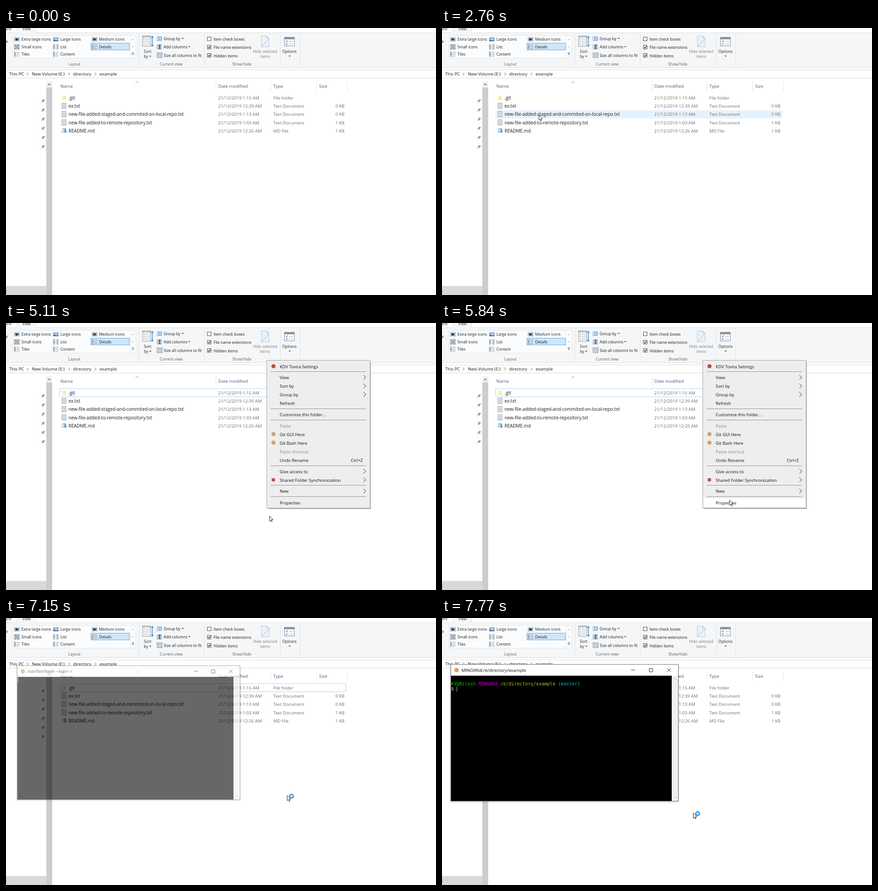
An HTML page for the animation above (8 s loop, 949 by 590 pixels).

```html
<!DOCTYPE html>
<html lang="en">
<head>
<meta charset="utf-8">
<title>Opening a shell from the file explorer</title>
<style>
  html, body { margin: 0; width: 100%; height: 100%; overflow: hidden; background: #fff; }
  svg { display: block; width: 100vw; height: 100vh; }
  text { font-family: "Open Sans", "Noto Sans", sans-serif; white-space: pre; }
  .mono { font-family: "DejaVu Sans Mono", "Liberation Mono", monospace; }
</style>
</head>
<body>
<svg id="stage" viewBox="0 0 949 590"></svg>
<script>
const LOOP = 8000;
const stage = document.getElementById('stage');

// --- markup helpers ---
const rect = (x, y, w, h, fill, stroke = 'none', extra = '') =>
  `<rect x="${x}" y="${y}" width="${w}" height="${h}" fill="${fill}" stroke="${stroke}" ${extra}/>`;
const path = (d, stroke, width = 1, fill = 'none') =>
  `<path d="${d}" stroke="${stroke}" stroke-width="${width}" fill="${fill}"/>`;
const dot = (x, y, r, fill) => `<circle cx="${x}" cy="${y}" r="${r}" fill="${fill}"/>`;
const text = (x, y, s, size, fill = '#1a1a1a', anchor = 'start') =>
  `<text x="${x}" y="${y}" font-size="${size}" fill="${fill}" text-anchor="${anchor}">${s}</text>`;
const vline = (x, y1, y2, color) => path(`M${x} ${y1}V${y2}`, color);
const hline = (y, x1, x2, color) => path(`M${x1} ${y}H${x2}`, color);
const caret = (x, y, color = '#333', dir = 1) =>
  path(`M${x - 2.3} ${y - dir}h4.6l-2.3 ${2.5 * dir}z`, 'none', 0, color);
const chevron = (x, y, w, h, color, width = 1) =>
  path(`M${x - w} ${y + h}L${x} ${y}L${x + w} ${y + h}`, color, width);
const group = (id, body) => `<g id="${id}">${body}</g>`;

// --- ribbon ---
const R = 8.55;

function layoutIcon(x, y, kind) {
  const frame = rect(x + .5, y + .5, 11, 8, '#fff', '#8b949c');
  if (kind === 'photo') return frame + rect(x + 2, y + 2, 8, 5, '#2d6fb5') + rect(x + 4, y + 3, 3, 4, '#1c2733');
  if (kind === 'large') return frame + rect(x + 1, y + 1, 10, 4, '#8dbce8') + path(`M${x + 1} ${y + 5}l5 1.5l5-.5v2h-10z`, 'none', 0, '#23508c');
  let s = '';
  if (kind === 'grid') {
    for (let i = 0; i < 9; i++)
      s += rect(x + .5 + i % 3 * 4, y - .5 + Math.floor(i / 3) * 4, 2.8, 2.8, i % 2 ? '#fff' : '#b9d0e6', '#78828c', 'stroke-width=".8"');
    return s;
  }
  for (let i = 0; i < 3; i++) {
    const yy = y - .5 + i * 4;
    s += rect(x + .5, yy, 2.6, 2.6, i === 1 ? '#8dbce8' : '#fff', '#78828c', 'stroke-width=".8"');
    s += hline(yy + 1.3, x + 5, x + (kind === 'list' ? 7 : 12), '#7d8791');
    if (kind === 'list') s += rect(x + 8.5, yy, 2.6, 2.6, '#fff', '#78828c', 'stroke-width=".8"');
  }
  return s;
}

function checkbox(y, label, on) {
  return rect(444.5, y - 4.5, 8, 8, '#fff', '#444') +
    (on ? path(`M446.3 ${y - .4}l1.8 2l3.2-4.2`, '#111', 1.4) : '') +
    text(458, y + 3.5, label, R);
}

function ribbon() {
  let s = rect(0, 10, 949, 77, '#f5f6f7') + rect(24, 0, 41, 11, '#f5f6f7') +
    path('M0 10.5H24.5V0M65.5 0V10.5H949', '#dcddde') + hline(87.5, 0, 949, '#dadbdc') +
    text(12, 5, 'Share', R, '#333', 'end') + text(36, 5, 'View', R, '#333') +
    text(4, 33, 'ne', R, '#333', 'end') + rect(0, 53, 1, 3, '#b9bec3');
  [293.5, 437.5, 605.5, 648.5].forEach(x => s += vline(x, 13, 84, '#e1e2e4'));

  s += rect(15.5, 16.5, 271, 50, '#fbfcfd', '#e3e5e7') + vline(274.5, 17, 66, '#e6e8ea');
  s += rect(187.5, 33.5, 85, 15, '#cfe6fa', '#64a9e3');
  [
    [18, 0, 'photo', 'Extra large icons'], [104, 0, 'large', 'Large icons'], [189.5, 0, 'photo', 'Medium icons'],
    [18, 1, 'grid', 'Small icons'], [104, 1, 'list', 'List'], [189.5, 1, 'details', 'Details'],
    [18, 2, 'details', 'Tiles'], [104, 2, 'details', 'Content']
  ].forEach(([x, row, kind, label]) => {
    const y = 20.5 + row * 16.3;
    s += layoutIcon(x, y, kind) + text(x + 16, y + 7.9, label, R);
  });
  s += caret(280, 25.5, '#b5b9bd', -1) + caret(280, 41.5, '#b5b9bd') +
    hline(54.5, 277.5, 282.5, '#2f4b8f') + caret(280, 58, '#2f4b8f');

  s += rect(301.5, 17.5, 18, 23, '#fff', '#8d959d') + rect(302, 18, 17, 3, '#b9c3cc');
  for (let i = 0; i < 7; i++) s += hline(22.5 + i * 2.6, 303, 318, i % 2 ? '#a3adb6' : '#c3cbd2');
  s += vline(307.5, 18, 40, '#fff') + vline(313.5, 18, 40, '#fff');
  s += path('M323 19V40M320.8 21.5L323 18.5L325.2 21.5M320.8 37.5L323 40.5L325.2 37.5', '#2c7fcb', 1.3);
  s += text(312.5, 54.6, 'Sort', R, '#222', 'middle') + text(309, 66, 'by', R, '#222', 'middle') + caret(318.5, 62.5);

  s += rect(336.5, 19.5, 7, 8, '#a9d2f3', '#5f9fd6') + path('M333.5 19v9M333 28.5h3M333 19h3', '#9aa2aa');
  s += rect(333.5, 37.5, 10, 9, '#fff', '#8b949c') + rect(338, 36, 3, 11, '#2d6fb5') + vline(336.5, 38, 46, '#333');
  s += rect(333.5, 57.5, 11, 8, '#fff', '#7d8791') + path('M333 60.5h12M333 63h12M337.5 57v9M341.5 57v9', '#8b949c', .8) +
    path('M333.5 55h11M333.5 53.5v3M344.5 53.5v3', '#2c7fcb', .9);
  s += text(348, 27.3, 'Group by', R) + caret(390, 23) + text(348, 45.3, 'Add columns', R) + caret(404.3, 41.3) +
    text(348, 63.6, 'Size all columns to fit', R);

  s += checkbox(24.5, 'Item check boxes', false) + checkbox(42.8, 'File name extensions', true) +
    checkbox(61, 'Hidden items', true);

  s += path('M563.5 17.5h12l5 5v19h-17z', '#b4c9dc', 1, '#e9f2fa') + path('M575.5 17.5v5h5M564 41L580 24', '#9dbbd6');
  s += text(572, 54.6, 'Hide selected', R, '#7b7e82', 'middle') + text(572, 66, 'items', R, '#7b7e82', 'middle');

  s += rect(614.5, 20.5, 22, 19, '#fff', '#7d868f') + rect(615, 21, 21, 4, '#8b949c');
  [29, 35].forEach(y => s += path(`M617.5 ${y}l1.6 1.8l3-3.8`, '#2c7fcb', 1.2) + hline(y + .5, 625, 634, '#a3abb3'));
  s += text(625.6, 54.6, 'Options', R, '#222', 'middle') + caret(626, 62);

  [['Layout', 151], ['Current view', 364.5], ['Show/hide', 520.5]]
    .forEach(([label, x]) => s += text(x, 83, label, R, '#5c5e60', 'middle'));
  return s;
}

// --- address bar, navigation pane, column heads ---
function chrome() {
  let s = hline(92.5, 0, 949, '#d9d9d9') + hline(110.5, 0, 949, '#d9d9d9');
  [[7, 'This PC'], [57, 'New Volume (E:)'], [148.3, 'directory'], [206.5, 'example']]
    .forEach(([x, label]) => s += text(x, 105.3, label, 9.6));
  [47.5, 139.3, 197.5].forEach(x => s += path(`M${x - 1.5} 98.7l3 3l-3 3`, '#555'));

  s += rect(0, 570, 89, 20, '#d9d9d9') + text(1.2, 584.5, ')', 9.6, '#1d3f7a', 'end');
  s += rect(89, 118, 13, 472, '#f0f0f0') + rect(89, 131.5, 13, 459, '#cdcdcd') + chevron(95.5, 123.3, 3, 3, '#505050', 1.2);
  for (let i = 0; i < 6; i++)
    s += `<g transform="translate(81.5 ${161.3 + i * 20.25}) rotate(45)">` +
      rect(-1.8, -4.3, 3.6, 4.3, '#8d959c') + rect(-3, 0, 6, 1.4, '#8d959c') + rect(-.5, 1, 1, 4, '#8d959c') + '</g>';

  [[120, 'Name'], [468.5, 'Date modified'], [590, 'Type'], [691, 'Size']]
    .forEach(([x, label]) => s += text(x, 132.4, label, 9.8, '#45597a'));
  [463.5, 584.5, 685.5, 753.5].forEach(x => s += vline(x, 117, 140, '#e4e5e7'));
  return s + chevron(289, 118.2, 3, 3, '#808080');
}

// --- file list ---
const ROW_TOP = 145.2, ROW_H = 18.2;
const FILES = [
  ['.git', '21/12/2019 1:15 AM', 'File folder', ''],
  ['ex.txt', '21/12/2019 12:39 AM', 'Text Document', '0 KB'],
  ['new-file-added-staged-and-commited-on-local-repo.txt', '21/12/2019 1:13 AM', 'Text Document', '0 KB'],
  ['new-file-added-to-remote-repository.txt', '21/12/2019 1:03 AM', 'Text Document', '1 KB'],
  ['README.md', '21/12/2019 12:26 AM', 'MD File', '1 KB']
];

function fileIcon(i, y) {
  if (i === 0) return rect(123.5, y - 5, 7.5, 10, '#fdeebb') + rect(129, y - 3.5, 3, 8.5, '#fbe3a0');
  if (i === 4) return path(`M125 ${y - 5}h7l2 9h-5l-7-1z`, 'none', 0, '#5d9ed3') + path(`M125 ${y - 4}l5 1l-2 6l-6-1z`, 'none', 0, '#cfe4f4');
  let s = rect(123.5, y - 6.2, 9, 11.8, '#fff', '#8a8f94');
  for (let k = 0; k < 4; k++) s += hline(y - 3.6 + k * 2.3, 125, 131, '#9aa0a6');
  return s;
}

const fileList = () => FILES.map(([name, date, type, size], i) => {
  const y = ROW_TOP + ROW_H * (i + .5), b = y + 3.7;
  return fileIcon(i, y) + text(138, b, name, 9.98) + text(468.5, b, date, 9.68, '#6d6d6d') +
    text(590, b, type, 9.62, '#6d6d6d') + text(747, b, size, 9.6, '#6d6d6d', 'end');
}).join('');

// --- context menu: [centre y, label, options] ---
const ITEMS = [
  [96, 'KDV Tovira Settings', { icon: '#b5563f' }],
  [120.5, 'View', { sub: 1 }], [139.5, 'Sort by', { sub: 1 }], [158.3, 'Group by', { sub: 1 }], [177.3, 'Refresh', {}],
  [202.3, 'Customize this folder...', {}],
  [227.2, 'Paste', { off: 1 }], [246, 'Git GUI Here', { icon: '#d2a566' }], [265, 'Git Bash Here', { icon: '#d2a566' }],
  [284, 'Paste shortcut', { off: 1 }], [303, 'Undo Rename', { key: 'Ctrl+Z' }],
  [328, 'Give access to', { sub: 1 }], [347, 'Shared Folder Synchronization', { sub: 1, square: '#b8503c' }],
  [371.7, 'New', { sub: 1 }],
  [397, 'Properties', {}]
];

function menu() {
  let s = rect(579, 86, 226, 325, '#8f8f8f', 'none', 'opacity=".75"') + rect(575.5, 82.5, 228, 326.5, '#eeeeee', '#a3a3a3') +
    rect(577.5, 0, 225, 19, '#fff', 'none', 'id="menuHot"');
  [107.5, 189.5, 214.5, 315.5, 358.5, 383.5].forEach(y => s += hline(y, 584, 795, '#929292'));
  ITEMS.forEach(([y, label, o]) => {
    s += text(604, y + 3.5, label, 9.5, o.off ? '#878787' : '#111');
    if (o.icon) s += dot(590.3, y - .5, 4.6, o.icon);
    if (o.square) s += rect(586.5, y - 4, 7, 7, o.square);
    if (o.sub) s += path(`M788.8 ${y - 5.3}l5.3 5l-5.3 5`, '#222');
    if (o.key) s += text(787.5, y + 3.5, o.key, 9.5, '#111', 'end');
  });
  return s;
}

// --- terminal window ---
function terminal() {
  const span = (s, color) => `<tspan fill="${color}">${s}</tspan>`;
  let s = rect(16, 102, 508, 307, '#000', 'none', 'rx="4" opacity=".05"') + rect(18, 102, 505, 305, '#000', 'none', 'rx="2" opacity=".1"');
  s += rect(19.5, 102.5, 502, 302, '#fff', '#6f7173') + rect(20, 127.5, 487, 276.7, '#000') + rect(507, 127.5, 14, 276.7, '#f0f0f0');
  s += chevron(514, 133.2, 3, 3, '#a9a9a9') + chevron(514, 398.5, 3, -3, '#a9a9a9');
  s += dot(32.2, 115, 5, '#d2a566');
  s += `<text id="title" x="43" y="118.7" font-size="9.65" fill="#111"></text>`;
  s += path('M417.5 115H426M457.5 111.5h7.5v7.5h-7.5zM497.2 111.2l7.8 7.8M505 111.2l-7.8 7.8', '#222');
  s += group('prompt', `<text class="mono" x="20" y="148.8" font-size="10.07">${
    span('KV@Nilesh ', '#00bf00') + span('MINGW64 ', '#bf00bf') + span('/e/directory/example ', '#bfbf00') + span('(master)', '#00bfbf')
  }</text><text class="mono" x="20" y="160.2" font-size="10.07" fill="#bfbfbf">$</text>`);
  return s + rect(0, 0, 1, 11, '#bfbfbf', 'none', 'id="textCursor"');
}

const pointer = () =>
  path('M0 0V11.4L2.6 9L4.4 13L6.2 12.2L4.4 8.3H8z', '#111', .9, '#fff') +
  group('busy', `<circle cx="9.6" cy="1.2" r="4" fill="#e6f4ff" stroke="#2b8fdf" stroke-width="2.6"/>`);

stage.innerHTML = rect(0, 0, 949, 590, '#fff') + ribbon() + chrome() +
  rect(118, 0, 632.5, ROW_H, '#e5f3ff', 'none', 'id="rowHot"') +
  rect(118.5, 145, 631.5, 18, 'none', '#a3d5f7', 'id="focus"') +
  fileList() + group('menu', menu()) + group('term', terminal()) + group('pointer', pointer());

const el = {};
stage.querySelectorAll('[id]').forEach(n => el[n.id] = n);

// --- pointer path: [ms, x, y] ---
const KEYS = [
  [80, 855, 559], [740, 283, 194], [920, 283, 194], [1020, 266, 190], [1360, 184, 184], [1720, 231, 191],
  [1770, 231, 191], [2170, 327, 189], [2570, 257, 192], [2760, 214, 192.5], [2990, 214, 192.5],
  [3790, 490, 352], [3920, 622.5, 328.5], [4110, 699, 321], [4260, 699, 321], [4820, 575.5, 409.5],
  [5000, 575.5, 409.5], [5300, 599, 464], [5500, 601, 447], [5790, 634.5, 391.5], [5840, 634.5, 391.5],
  [6530, 632, 262], [6710, 632, 262], [7150, 620.5, 392], [7300, 617, 410], [7510, 613, 410], [7770, 554.5, 431]
];

// Slope at a key; zero at turning points and holds, so the path never overshoots.
function slope(i, c) {
  const a = KEYS[i - 1], b = KEYS[i], d = KEYS[i + 1];
  if (!a || !d || (b[c] - a[c]) * (d[c] - b[c]) <= 0) return 0;
  return (d[c] - a[c]) / (d[0] - a[0]);
}

function along(t, c) {
  const last = KEYS.length - 1;
  if (t >= KEYS[last][0]) return KEYS[last][c];
  const i = Math.max(0, KEYS.findIndex(k => k[0] > t) - 1);
  const a = KEYS[i], b = KEYS[i + 1], h = b[0] - a[0], u = Math.max(0, (t - a[0]) / h), v = 1 - u;
  return v * v * (1 + 2 * u) * a[c] + u * u * (3 - 2 * u) * b[c] +
    h * u * v * (v * slope(i, c) - u * slope(i + 1, c));
}

const show = (node, on) => node.setAttribute('display', on ? 'inline' : 'none');

function render(t) {
  const x = along(t, 1), y = along(t, 2);
  show(el.pointer, t >= 80);
  el.pointer.setAttribute('transform', `translate(${x} ${y})`);
  show(el.busy, t >= 6900);

  const menuOpen = t >= 5030 && t < 6760;
  const row = Math.floor((y - ROW_TOP) / ROW_H);
  show(el.rowHot, t >= 80 && t < 5000 && x > 118 && x < 750 && row >= 0 && row < FILES.length);
  el.rowHot.setAttribute('y', ROW_TOP + row * ROW_H);
  show(el.focus, t >= 5030 && t < 7250);

  show(el.menu, menuOpen);
  const hot = ITEMS.find(([cy]) => Math.abs(y - cy) < 9.5);
  show(el.menuHot, hot && x > 576 && x < 803);
  if (hot) el.menuHot.setAttribute('y', hot[0] - 9.5);

  const k = Math.min(1, Math.max(0, (t - 7080) / 120));
  const scale = .95 + .05 * k;
  show(el.term, k > 0);
  el.term.setAttribute('opacity', k);
  el.term.setAttribute('transform', `translate(270.3 253.5) scale(${scale}) translate(-270.3 -253.5)`);
  el.title.textContent = t < 7560 ? '/usr/bin/bash --login -i' : 'MINGW64:/e/directory/example';
  const ready = t >= 7700;
  show(el.prompt, ready);
  el.textCursor.setAttribute('x', ready ? 32.3 : 21);
  el.textCursor.setAttribute('y', ready ? 151.5 : 129);
}

const start = performance.now();
function tick() {
  render((performance.now() - start) % LOOP);
  requestAnimationFrame(tick);
}
tick();
</script>
</body>
</html>
```
